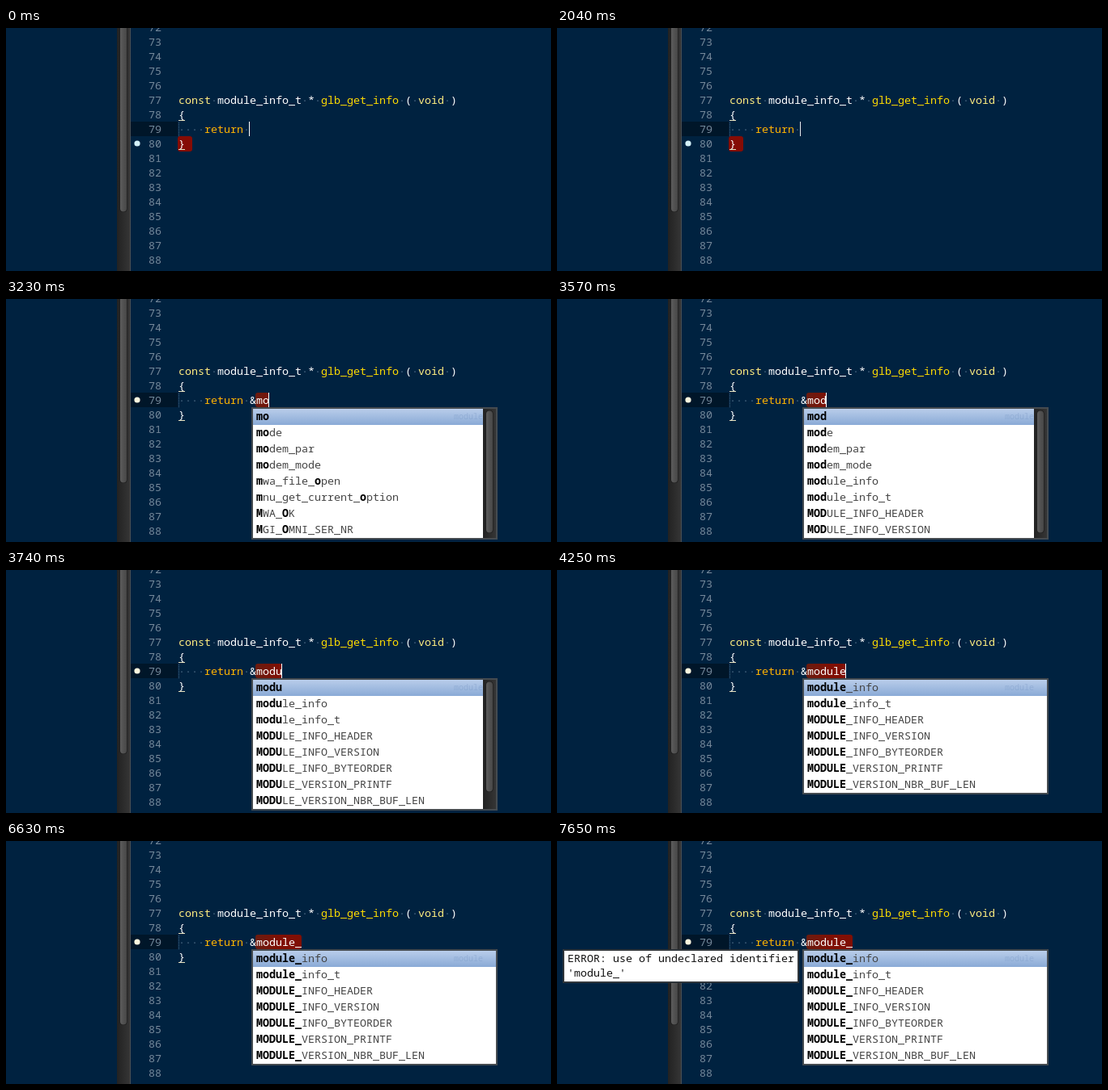
An HTML page with a canvas for the animation above (8 s loop, 673 by 301 pixels).

```html
<!DOCTYPE html>
<html lang="en">
<head>
<meta charset="utf-8">
<title>Code completion</title>
<style>
  html, body { margin: 0; width: 100%; height: 100%; overflow: hidden; background: #002240; }
  canvas { display: block; }
</style>
</head>
<body>
<canvas id="stage" width="673" height="301"></canvas>
<script>
const ctx = document.getElementById("stage").getContext("2d");
const LOOP = 8000, CHAR = 8, LINE = 18, ROW = 20, LEFT = 213, WORD_X = 308;
const FONT = '13.333px "Noto Sans Mono", "DejaVu Sans Mono", monospace';
const WHITE = "#fff", PALE = "#ffee80", YELLOW = "#ffdd00", ORANGE = "#ffb400", FAINT = "#47647f";

// Each timeline is a list of [start in ms, value].
const typing = [[0, ""], [2380, "&"], [2720, "&m"], [3230, "&mo"], [3570, "&mod"], [3740, "&modu"],
  [3910, "&modul"], [4080, "&module"], [4760, "&module_"]];
const errorLength = [[0, 0], [2890, 1], [3230, 2], [3570, 3], [3740, 4], [3910, 5], [4250, 6], [4930, 7]];
const caretAlpha = [[0, 1], [340, .5], [510, 0], [1020, 1], [1360, .5], [1530, 0], [2040, .9], [2210, 1],
  [4590, .5], [4760, 1], [5270, .5], [5440, 0], [5950, .5], [6120, 1], [6460, .5], [6630, 0],
  [6970, .5], [7140, 1], [7480, .5], [7650, 0]];
const TOOLTIP_START = 6970;

const modeWords = ["mode", "modem_par", "modem_mode"];
const moduleWords = ["module_info", "module_info_t", "MODULE_INFO_HEADER", "MODULE_INFO_VERSION",
  "MODULE_INFO_BYTEORDER", "MODULE_VERSION_PRINTF", "MODULE_VERSION_NBR_BUF_LEN"];
const otherWords = ["mwa_file_open", "mnu_get_current_option", "MWA_OK", "MGI_OMNI_SER_NR"];

const at = (timeline, t) => timeline.findLast(([start]) => start <= t)[1];
const baseline = line => 94 + (line - 77) * LINE;

function completions(word) {
  if (word.length < 2) return [word];
  if (word === "mo") return [word, ...modeWords, ...otherWords];
  if (word === "mod") return [word, ...modeWords, ...moduleWords].slice(0, 8);
  return word.length < 6 ? [word, ...moduleWords] : moduleWords;
}

function box(x, y, w, h, fill, radius = 0) {
  ctx.fillStyle = fill;
  ctx.beginPath();
  ctx.roundRect(x, y, w, h, radius);
  ctx.fill();
}

function gradient(x0, y0, x1, y1, from, to) {
  const g = ctx.createLinearGradient(x0, y0, x1, y1);
  g.addColorStop(0, from);
  g.addColorStop(1, to);
  return g;
}

function text(str, x, y, color, weight = "") {
  ctx.font = weight + " " + FONT;
  ctx.fillStyle = color;
  ctx.fillText(str, x, y);
}

// Draws [text, color] pieces one after another; spaces show as dots.
function code(line, pieces) {
  let x = LEFT;
  for (const [str, color] of pieces) {
    text(str, x, baseline(line), color);
    text(str.replace(/[^ ]/g, " ").replace(/ /g, (_, i) => str[i] === " " ? "·" : " "), x, baseline(line), FAINT);
    x += str.length * CHAR;
  }
}

function brace(str, line) {
  text(str, LEFT, baseline(line), WHITE);
  box(LEFT, baseline(line) + 2, CHAR, 1, "#e8e4c0");
}

function scrollbar(x, y, w, h, thumbY, thumbH) {
  box(x, y, w, h, gradient(x, 0, x + w, 0, "#222", "#353535"));
  box(x + 3.5, thumbY, 9, thumbH, "#1a1a1a", 4);
  box(x + 4, thumbY + .5, 8, thumbH - 1, gradient(x + 4, 0, x + 12, 0, "#5c5c5c", "#474747"), 4);
}

function editor(t) {
  const typed = at(typing, t), errors = at(errorLength, t);
  box(0, 0, 673, 301, "#002240");
  scrollbar(137, 0, 16, 301, -20, 248);
  box(153, 0, 1, 301, "#4a4f54");

  box(154, 116, 58, LINE, "#001629");
  for (let n = 72; n <= 89; n++) text(n, 176, baseline(n), "#75889a");
  box(158.4, (errors ? 125 : 143) - 3.6, 7.2, 7.2, errors ? "#fbf6df" : "#d3f0f8", 3.6);

  if (errors) box(WORD_X, 116, errors * CHAR + 1, LINE, gradient(WORD_X, 0, WORD_X + 30, 0, "#6a1c10", "#800f04"), 3);
  else box(212, 134, 18, 19, "#850c05", 3);

  code(77, [["const ", PALE], ["module_info_t * ", WHITE], ["glb_get_info ", YELLOW],
    ["( ", WHITE], ["void ", PALE], [")", WHITE]]);
  brace("{", 78);
  code(79, [["    return ", ORANGE], [typed, WHITE]]);
  brace("}", 80);
  for (let y = 117; y < 134; y += 2) box(LEFT, y, 1, 1, FAINT);

  ctx.globalAlpha = at(caretAlpha, t);
  box(300 + typed.length * CHAR, 116, 1, LINE, WHITE);
  ctx.globalAlpha = 1;
}

function popup(word) {
  const rows = completions(word), height = rows.length * ROW, scrolls = rows.length > 7;
  box(303, 134, 304, height + 4, "#454b50");
  box(305, 136, 300, height, WHITE);
  box(305, 136, 300, ROW, gradient(0, 136, 0, 156, "#b9cdea", "#8aaad6"));
  ctx.font = '10px "Noto Sans Mono", monospace';
  ctx.fillStyle = "rgba(105, 140, 190, .3)";
  ctx.fillText("module", 553, 149);

  rows.forEach((row, i) => {
    let matched = 0;
    [...row].forEach((char, col) => {
      const hit = char.toLowerCase() === word[matched];
      if (hit) matched++;
      text(char, 309 + col * CHAR, 150 + i * ROW, hit ? "#000" : "#444", hit ? "bold" : "");
    });
  });
  if (scrolls) scrollbar(589, 136, 16, height, 138, word.length < 4 ? 152 : 137);
}

function tooltip() {
  box(7, 134, 292, 42, "#30363b");
  box(9, 136, 288, 38, WHITE);
  text("ERROR: use of undeclared identifier", 13, 150, "#111");
  text("'module_'", 13, 168, "#111");
}

function draw(now) {
  const t = now % LOOP, word = at(typing, t).slice(1);
  editor(t);
  if (word) popup(word);
  if (t >= TOOLTIP_START) tooltip();
  requestAnimationFrame(draw);
}
requestAnimationFrame(draw);
</script>
</body>
</html>
```
